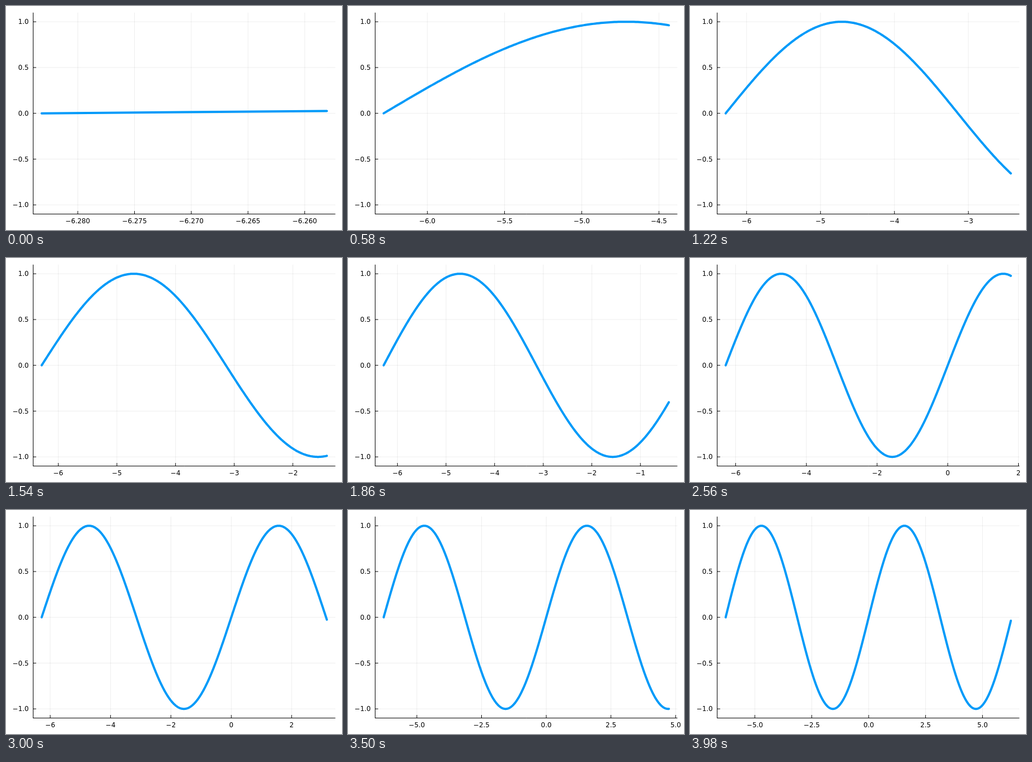
Animation, 600 px wide and 400 px high, one loop 4 s. Source, as an HTML page with a canvas:

```html
<!DOCTYPE html>
<html lang="en">
<head>
<meta charset="utf-8">
<title>Growing sine curve</title>
<style>
  html, body { margin: 0; width: 100%; height: 100%; overflow: hidden; background: #fff; }
  canvas { display: block; width: 600px; height: 400px; }
</style>
</head>
<body>
<canvas id="stage" width="600" height="400"></canvas>
<script>
const ctx = document.getElementById('stage').getContext('2d');

const LEFT = 48.4, RIGHT = 588.2, TOP = 11.8, BOTTOM = 371.5;
const FRAME_MS = 20, FRAMES = 200;
const X0 = -2 * Math.PI, STEP = 4 * Math.PI / 1000;
const FONT = '11.85px "DejaVu Sans", sans-serif';
const HALF_CAP = 4.32;

const toY = v => (TOP + BOTTOM) / 2 - v * (BOTTOM - TOP) / 2.2;

// Scores candidate tick sets by count, zero, coverage and roundness.
function niceTicks(min, max) {
  const steps = [[1, 1], [5, 0.9], [2, 0.7], [2.5, 0.5], [3, 0.2]];
  const kMin = 4, kMax = 8, ideal = 5;
  const width = max - min;
  let best = [], top = -Infinity;
  for (let z = Math.ceil(Math.log10(width)); 2 * kMax * 10 ** (z + 1) > width; z--) {
    for (let k = kMin; k <= 2 * kMax; k++) {
      for (const [q, nice] of steps) {
        const step = Number((q * 10 ** z).toPrecision(6));
        const span = (k - 1) * step;
        for (let r = Math.ceil((max - span) / step); r * step <= min; r++) {
          const ticks = [];
          for (let i = 0; i < k; i++) {
            const v = (r + i) * step;
            if (v >= min && v <= max) ticks.push(v);
          }
          const n = ticks.length;
          if (n < kMin || n > kMax) continue;
          const count = 1 - Math.abs(n - ideal) / ideal;
          const zero = r <= 0 && -r < k ? 1 : 0;
          const cover = 1.5 * width / ((n - 1) * step);
          let score = count / 4 + zero / 6 + cover / 3 + nice / 4;
          if (span >= 2 * width) score -= 1000;
          if (score > top) {
            top = score;
            best = ticks;
          }
        }
      }
    }
  }
  return best;
}

function labels(ticks) {
  const plain = ticks.map(v => String(Number(v.toFixed(6))));
  const digits = Math.max(...plain.map(s => (s.split('.')[1] || '').length));
  return plain.map(s => Number(s).toFixed(digits).replace('-', '\u2212'));
}

function line(x1, y1, x2, y2, color) {
  ctx.strokeStyle = color;
  ctx.lineWidth = 1;
  ctx.lineCap = 'butt';
  ctx.beginPath();
  ctx.moveTo(x1, y1);
  ctx.lineTo(x2, y2);
  ctx.stroke();
}

function draw(ms) {
  const frame = Math.floor(ms / FRAME_MS + 1e-6) % FRAMES;
  const last = 2 + 5 * frame;
  const span = last * STEP;
  const min = X0 - 0.03 * span, max = X0 + 1.03 * span;
  const toX = v => LEFT + (v - min) / (max - min) * (RIGHT - LEFT);
  const xTicks = niceTicks(min, max);
  const yTicks = [-1, -0.5, 0, 0.5, 1];
  const grid = 'rgba(0,0,0,0.07)';

  ctx.fillStyle = '#fff';
  ctx.fillRect(0, 0, 600, 400);

  for (const v of xTicks) line(toX(v), TOP, toX(v), BOTTOM, grid);
  for (const v of yTicks) line(LEFT, toY(v), RIGHT, toY(v), grid);

  line(48.5, TOP, 48.5, 372, '#000');
  line(48, 371.5, RIGHT, 371.5, '#000');
  for (const v of xTicks) line(toX(v), BOTTOM, toX(v), BOTTOM - 5.4, '#000');
  for (const v of yTicks) line(LEFT, toY(v), LEFT + 5.4, toY(v), '#000');

  ctx.font = FONT;
  ctx.fillStyle = '#000';
  ctx.textBaseline = 'alphabetic';
  ctx.textAlign = 'center';
  labels(xTicks).forEach((s, i) => ctx.fillText(s, toX(xTicks[i]), 387.6));
  ctx.textAlign = 'right';
  labels(yTicks).forEach((s, i) => ctx.fillText(s, 40.6, toY(yTicks[i]) + HALF_CAP));

  ctx.strokeStyle = '#009af9';
  ctx.lineWidth = 4;
  ctx.lineCap = ctx.lineJoin = 'round';
  ctx.beginPath();
  for (let i = 0; i <= last; i++) {
    const x = X0 + i * STEP;
    ctx.lineTo(toX(x), toY(Math.sin(x)));
  }
  ctx.stroke();
}

function loop(now) {
  draw(Math.max(0, now));
  requestAnimationFrame(loop);
}

draw(0);
requestAnimationFrame(loop);
</script>
</body>
</html>
```
